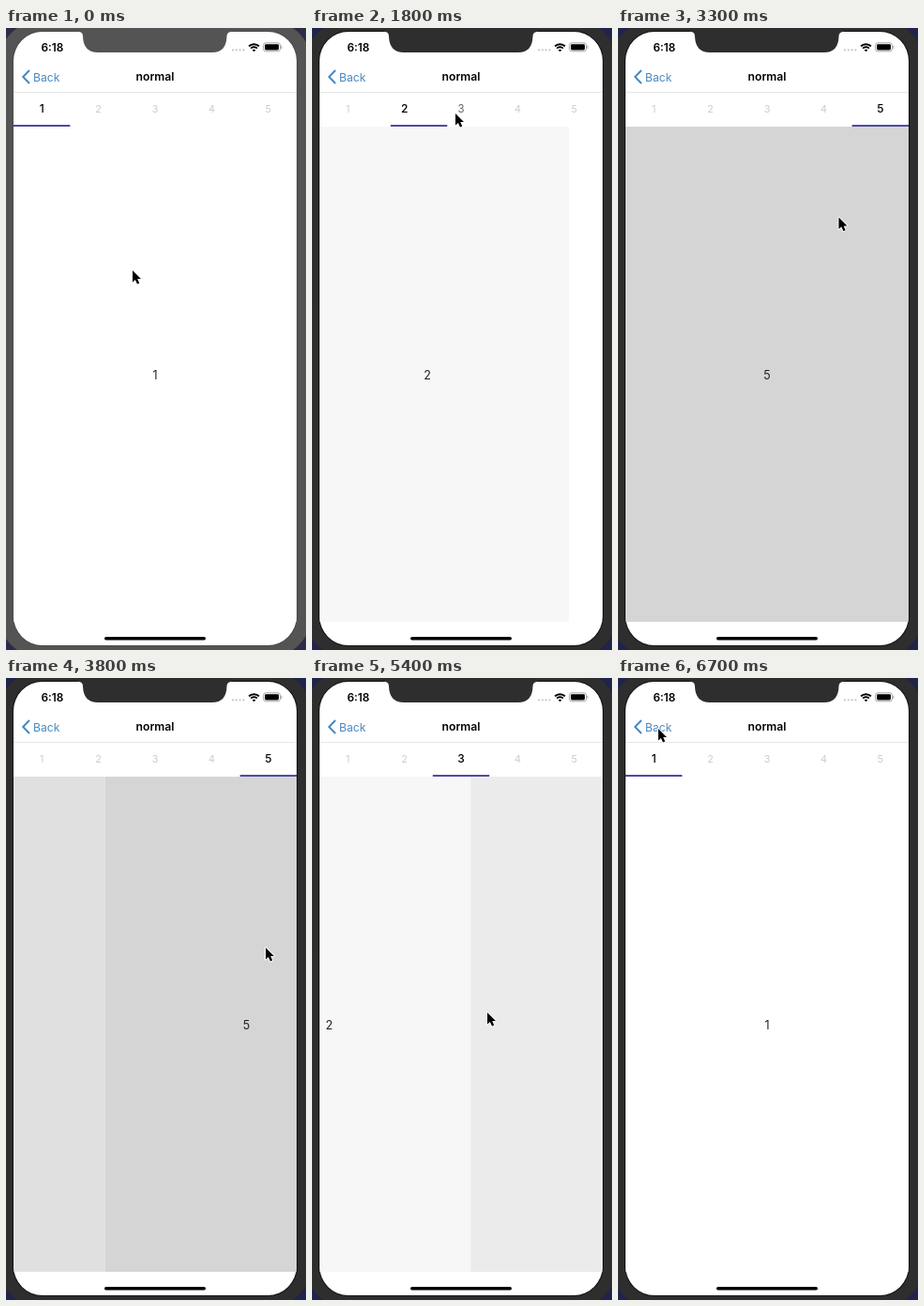
These frames come from a looping animation (320x662 px, 6.8 s). An HTML page with a canvas:

```html
<!DOCTYPE html>
<html lang="en">
<head>
<meta charset="utf-8">
<title>Tab pager</title>
<style>
html, body { margin: 0; width: 100%; height: 100%; overflow: hidden; background: #20234a; }
canvas { display: block; width: 320px; height: 662px; }
</style>
</head>
<body>
<canvas id="stage" width="320" height="662"></canvas>
<script>
const ctx = document.getElementById('stage').getContext('2d');
const LOOP = 6800, ACTIVE_AT = 1000;
const LEFT = 8, RIGHT = 310, PAGE = RIGHT - LEFT, TAB = PAGE / 5;
const SHADES = ['#ffffff', '#f7f7f7', '#ebebeb', '#e0e0e0', '#d5d5d5'];
const FONT = 'Inter, Roboto, sans-serif';

// Pointer path: time, x, y
const POINTER = [
  [0, 135, 258], [900, 98, 90], [1150, 98, 90], [1550, 153, 91], [1850, 153, 91],
  [2250, 218, 93], [2450, 218, 93], [2870, 279, 93], [3050, 279, 93],
  [3520, 200, 290], [3790, 277, 287], [3950, 277, 287], [4310, 123, 340],
  [4500, 302, 348], [4560, 306, 349], [5150, 60, 358], [5380, 187, 356],
  [5430, 187, 356], [5690, 90, 352], [5820, 200, 350], [6450, 200, 350], [6700, 43, 54]
];
const TAPS = [1050, 1708, 2320, 2930];
const SWIPES = [
  { press: 3520, release: 3790, settle: 350, mark: 4080 },
  { press: 4310, release: 4560, settle: 300, mark: 4840 },
  { press: 5150, release: 5380, settle: 300, mark: 5680 },
  { press: 5690, release: 5820, settle: 220, mark: 6180 }
];

const clamp = v => Math.max(0, Math.min(1, v));
const progress = (t, start, length) => clamp((t - start) / length);
const smooth = k => k * k * (3 - 2 * k);
const inOut = (k, n) => k < .5 ? Math.pow(2 * k, n) / 2 : 1 - Math.pow(2 - 2 * k, n) / 2;
const outCubic = k => 1 - Math.pow(1 - k, 3);

function pointerAt(t) {
  const i = POINTER.findIndex(p => p[0] > t);
  if (i < 0) return POINTER[POINTER.length - 1].slice(1);
  const [t0, x0, y0] = POINTER[i - 1], [t1, x1, y1] = POINTER[i];
  const k = smooth((t - t0) / (t1 - t0));
  return [x0 + (x1 - x0) * k, y0 + (y1 - y0) * k];
}

function swipeShift(t, s) {
  if (t < s.press) return 0;
  const drag = (pointerAt(Math.min(t, s.release))[0] - pointerAt(s.press)[0]) / PAGE;
  return drag + (1 - drag) * outCubic(progress(t, s.release, s.settle));
}

function stateAt(t) {
  let page = 0, mark = 0, loaded = 0, pressed = false;
  for (const tap of TAPS) {
    const move = inOut(progress(t, tap, 300), 3);
    page += move;
    mark += inOut(progress(t, tap, 260), 2);
    if (move > .5) loaded++;
    pressed = pressed || (t >= tap - 90 && t < tap);
  }
  for (const s of SWIPES) {
    page -= swipeShift(t, s);
    mark -= inOut(progress(t, s.mark, 200), 2);
    pressed = pressed || (t >= s.press && t < s.release);
  }
  return { page, mark, loaded, pressed };
}

function rect(x, y, w, h, color) {
  ctx.fillStyle = color;
  ctx.fillRect(x, y, w, h);
}

function round(x, y, w, h, r) {
  ctx.beginPath();
  ctx.roundRect(x, y, w, h, r);
}

function label(text, x, y, size, color, weight = 400, align = 'center') {
  ctx.font = `${weight} ${size}px ${FONT}`;
  ctx.textAlign = align;
  ctx.fillStyle = color;
  ctx.fillText(text, x, y);
}

function drawPages({ page, loaded }) {
  for (let i = 0; i <= loaded; i++) {
    const x = LEFT + (i - page) * PAGE;
    if (x >= RIGHT || x <= LEFT - PAGE) continue;
    rect(x, 105, PAGE, 527, SHADES[i]);
    label(i + 1, x + PAGE / 2, 373.5, 12.5, '#222');
  }
}

function drawTabs({ mark }) {
  rect(LEFT, 68, PAGE, 1, '#e6e6e6');
  for (let i = 0; i < 5; i++) {
    const on = clamp(2 * (1 - Math.abs(i - mark)));
    const gray = Math.round(204 * (1 - on));
    label(i + 1, LEFT + TAB * (i + .5), 90.3, 10.8 + on * 1.2,
      `rgb(${gray},${gray},${gray})`, on > .7 ? 500 : 400);
  }
  rect(LEFT + mark * TAB, 103, TAB, 2, '#4f4aa8');
}

function drawWifi() {
  ctx.save();
  ctx.beginPath();
  ctx.moveTo(264.5, 25.5);
  ctx.lineTo(257, 17);
  ctx.lineTo(257, 13);
  ctx.lineTo(272, 13);
  ctx.lineTo(272, 17);
  ctx.clip();
  ctx.strokeStyle = '#000';
  ctx.lineWidth = 1.9;
  for (const r of [1.2, 4.7, 7.8]) {
    ctx.beginPath();
    ctx.arc(264.5, 25, r, Math.PI, 2 * Math.PI);
    ctx.stroke();
  }
  ctx.restore();
}

function drawBars() {
  label('6:18', 49.3, 24.8, 11.8, '#000', 600);
  ctx.fillStyle = '#c8c8c8';
  for (let i = 0; i < 4; i++) {
    ctx.beginPath();
    ctx.arc(242 + i * 3.8, 23.4, 1.1, 0, 7);
    ctx.fill();
  }
  drawWifi();
  round(274.5, 15.8, 18, 9, 2.6);
  ctx.strokeStyle = '#a5a5a5';
  ctx.lineWidth = 1;
  ctx.stroke();
  round(276, 17.2, 15, 6.3, 1.4);
  ctx.fillStyle = '#000';
  ctx.fill();
  rect(293.4, 18.8, 1, 3, '#a5a5a5');

  ctx.beginPath();
  ctx.moveTo(25, 45);
  ctx.lineTo(18.2, 52);
  ctx.lineTo(25, 59);
  ctx.strokeStyle = '#4a88c2';
  ctx.lineWidth = 2;
  ctx.stroke();
  label('Back', 29, 56.7, 12.2, '#4a88c2', 400, 'left');
  label('normal', 159, 56.4, 12.2, '#000', 600);
}

function drawNotch(color) {
  ctx.beginPath();
  ctx.moveTo(76, 3);
  ctx.lineTo(78, 4);
  ctx.quadraticCurveTo(82, 4.5, 82, 9);
  ctx.quadraticCurveTo(82.5, 26, 98, 26);
  ctx.lineTo(220, 26);
  ctx.quadraticCurveTo(235, 26, 235.5, 9);
  ctx.quadraticCurveTo(235.5, 4.5, 240, 4);
  ctx.lineTo(242, 3);
  ctx.fillStyle = color;
  ctx.fill();
}

function drawPointer([x, y], pressed) {
  if (pressed) {
    for (const [r, color] of [[21, 'rgba(255,255,255,.75)'], [20, '#111']]) {
      ctx.beginPath();
      ctx.arc(x - .5, y, r, 0, 7);
      ctx.strokeStyle = color;
      ctx.lineWidth = 1.2;
      ctx.stroke();
    }
  }
  ctx.save();
  ctx.translate(x, y);
  ctx.beginPath();
  ctx.moveTo(0, 0);
  for (const [px, py] of [[0, 12.5], [2.9, 9.9], [5, 14.6], [7.2, 13.6], [5.2, 9.1], [9, 8.9]]) ctx.lineTo(px, py);
  ctx.closePath();
  ctx.lineJoin = 'round';
  ctx.strokeStyle = '#fff';
  ctx.lineWidth = 1.8;
  ctx.stroke();
  ctx.fillStyle = '#000';
  ctx.fill();
  ctx.restore();
}

function draw(t) {
  const state = stateAt(t), active = t >= ACTIVE_AT;
  const bezel = active ? '#2e2e2e' : '#545454';
  rect(0, 0, 320, 662, active ? '#20234a' : '#2c2c48');
  round(-8, -8, 334, 678, 46);
  ctx.fillStyle = bezel;
  ctx.fill();

  round(LEFT, 4, PAGE, 653, 31);
  ctx.strokeStyle = active ? '#141414' : '#4a4a4a';
  ctx.lineWidth = 2;
  ctx.stroke();
  ctx.save();
  ctx.clip();
  rect(LEFT, 4, PAGE, 653, '#fff');
  drawPages(state);
  drawTabs(state);
  drawBars();
  round(105, 648, 108, 3.4, 1.7);
  ctx.fillStyle = '#000';
  ctx.fill();
  ctx.restore();

  drawNotch(bezel);
  drawPointer(pointerAt(t), state.pressed);
}

const start = performance.now();
function tick() {
  draw((performance.now() - start) % LOOP);
  requestAnimationFrame(tick);
}
tick();
</script>
</body>
</html>
```
